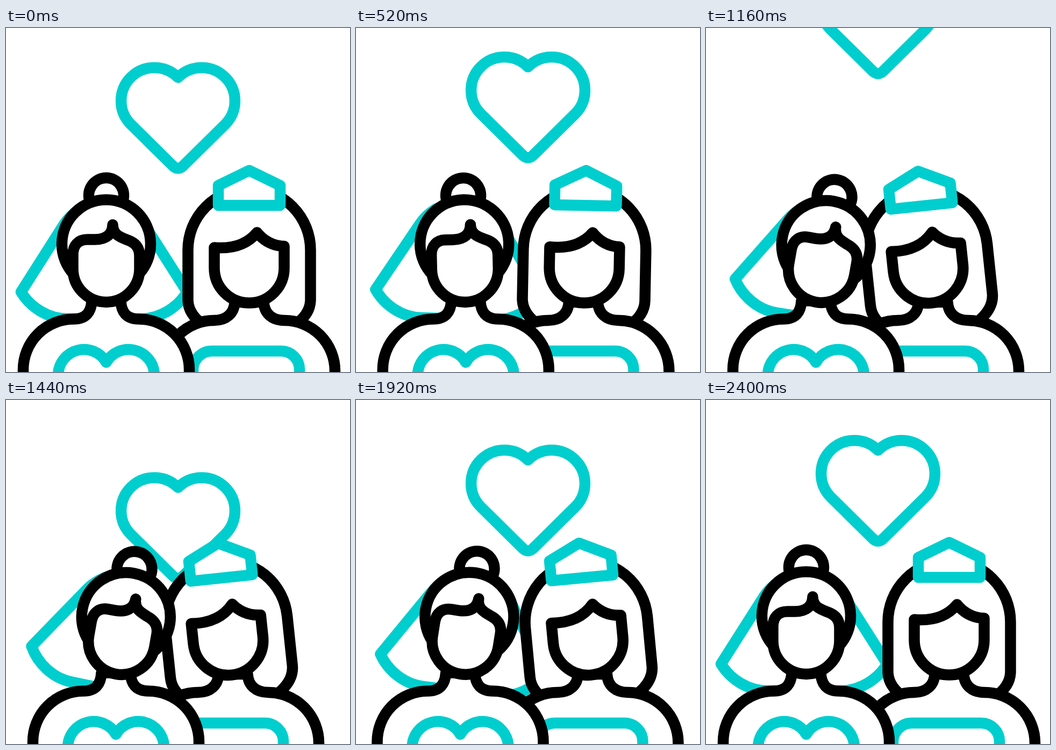
Write an HTML page that moves like this. It is 640 px wide and 640 px high and loops after 2440 ms.

```html
<!DOCTYPE html>
<html lang="en">
<head>
<meta charset="utf-8">
<title>Two brides</title>
<style>
  html, body { margin: 0; width: 100%; height: 100%; overflow: hidden; background: #fff; }
  svg { display: block; width: 100%; height: 100%; }
  path { stroke: #000; stroke-width: 20.5; stroke-linejoin: round; fill: #fff; }
  .teal { stroke: #00cece; }
</style>
</head>
<body>
<svg viewBox="0 0 640 640">
  <path id="heart" class="teal" d="M320 92A61 61 0 0 0 232 179L311 257Q320 265 329 257L408 179A61 61 0 0 0 320 92Z"/>
  <path id="veil" class="teal"/>

  <g id="woman">
    <g class="tilt">
      <path d="M367 552C347 538 338.500 523 338.500 505V413A114 114 0 0 1 566.500 413V505C566.500 523 558 538 538 552"/>
    </g>
    <path class="torso"/>
    <path class="teal" d="M348 650V636A35 35 0 0 1 383 601H512A34 34 0 0 1 546 635V650"/>
    <g class="tilt">
      <path d="M387.500 408.500Q440 413 467 380.500Q487 405 517.500 406V446.500A65 65 0 0 1 387.500 446.500Z"/>
      <path class="teal" d="M395 330H510V293L452.500 265L395 293Z"/>
    </g>
  </g>

  <g id="bride">
    <path class="torso"/>
    <path class="teal" d="M97 650V645A48 48 0 0 1 186.500 622A48 48 0 0 1 276 645V650"/>
    <g class="tilt">
      <path d="M157 325A32.500 32.500 0 1 1 216 325"/>
      <path d="M126 458A82.500 82.500 0 1 1 247 458"/>
      <path d="M124.500 448V422C124.500 404 135 393.500 151 393.500H165C187 393.500 198.500 383 198.500 366C198.500 384 212 389 225 394C240 399 248.500 408 248.500 424V448A62 62 0 0 1 124.500 448Z"/>
    </g>
  </g>
</svg>
<script>
const LOOP = 2440, STEP = 40, DRIFT = 0.0378;
const find = s => document.querySelector(s);
const heart = find('#heart'), veil = find('#veil');

const clamp = u => Math.min(1, Math.max(0, u));
const part = (t, a, b) => clamp((t - a) / (b - a));
// Eased rise from 0 to 1, and a soft bump that returns to 0
const ramp = (t, a, b) => { const u = part(t, a, b); return u * u * (3 - 2 * u); };
const bump = (t, a, b) => Math.sin(Math.PI * part(t, a, b)) ** 2;
const mix = (a, b, u) => a + (b - a) * u;

const move = (x, y) => `translate(${x} ${y})`;
const turn = (a, x, y) => `rotate(${a} ${x} ${y})`;
const put = (el, value) => el.setAttribute('transform', value);

// Shoulders and neck, symmetric about cx
function torso(cx, half, y) {
  const r = 94, w = half - r - 27;
  return `M${cx - half} 650V${y + r}a${r} ${r} 0 0 1 ${r} ${-r}c23 0 ${w - 1} -13 ${w} -34h54` +
    `c1 21 ${w - 23} 34 ${w} 34a${r} ${r} 0 0 1 ${r} ${r}V650`;
}

function veilPath(cx) {
  const p = (x, y, side) => `${cx + side * x} ${y}`;
  const l = (x, y) => p(x, y, -1), r = (x, y) => p(x, y, 1);
  return `M${l(154.5, 491)}L${l(75, 366)}Q${l(65, 350)} ${l(47, 338)}` +
    `H${cx + 47}Q${r(65, 350)} ${r(75, 366)}L${r(154.5, 491)}` +
    `C${r(137, 520)} ${r(104, 541)} ${r(68, 541)}H${cx - 68}` +
    `C${l(104, 541)} ${l(137, 520)} ${l(154.5, 491)}Z`;
}

// A person leans sideways by `shift` while the head tips by `angle`
function person(id, cx, half, y, pivot, shift, angle, back) {
  const el = find(id), heads = el.querySelectorAll('.tilt');
  el.querySelector('.torso').setAttribute('d', torso(cx, half, y));
  return t => {
    const lean = ramp(t, 0, 560) - ramp(t, 1720, 2080);
    const tip = -back * ramp(t, 0, 440) + (angle + back) * ramp(t, 440, 1120) -
      angle * ramp(t, 1840, 2240);
    const slide = move(shift * lean, 0), tilt = turn(tip, cx, pivot);
    put(el, slide);
    heads.forEach(h => put(h, tilt));
    return slide + tilt;
  };
}

// Drifts up, shoots off the top, then rises from behind the couple
function heartY(t) {
  const late = DRIFT * (LOOP - Math.max(t, 1560));
  if (t < 1240) return mix(-DRIFT * Math.min(t, 920), -286, part(t, 920, 1240) ** 2);
  return mix(late, 300, (1 - part(t, 1240, 1560)) ** 2);
}

// The veil trails the head and swings to rest
const sway = t => 3 * (ramp(t, 0, 200) - ramp(t, 800, 1120)) + 1.5 * bump(t, 0, 480) -
  bump(t, 1040, 1280) + 2 * bump(t, 1280, 1700) - 2 * bump(t, 1720, 2080);

veil.setAttribute('d', veilPath(182.5));
const bride = person('#bride', 186.5, 154.5, 541.5, 510, 18, 10, 1.8);
const woman = person('#woman', 452.5, 159.5, 544, 535, -30, -6, -1.4);

function draw(t) {
  put(heart, move(0, heartY(t)));
  put(veil, bride(t) + turn(sway(t), 186.5, 320));
  woman(t);
}

const start = performance.now();
function tick() {
  const t = (performance.now() - start) % LOOP;
  draw(Math.floor(t / STEP) * STEP);
  requestAnimationFrame(tick);
}
draw(0);
requestAnimationFrame(tick);
</script>
</body>
</html>
```
